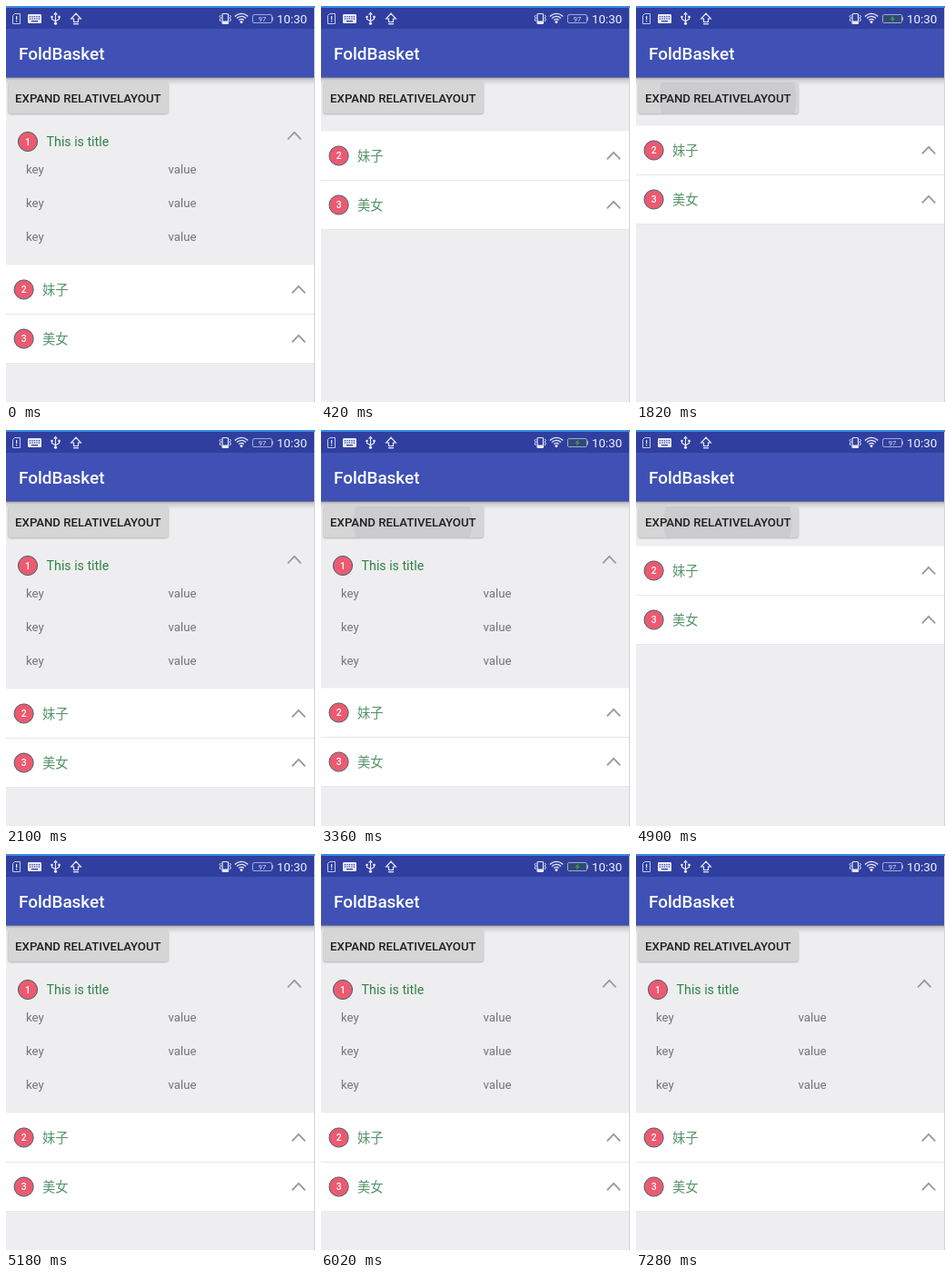
Animation of 340x435 px, one loop 8 s. Source, as an HTML page with a canvas:

```html
<!DOCTYPE html>
<html lang="en">
<head>
<meta charset="utf-8">
<title>Expandable list</title>
<style>
  html, body { margin: 0; width: 100%; height: 100%; overflow: hidden; background: #eeeef0; }
  canvas { display: block; width: 340px; height: 435px; }
</style>
</head>
<body>
<canvas id="stage"></canvas>
<script>
const W = 340, H = 435, LOOP = 8000, STEP = 70;
const PANEL_TOP = 123.5, PANEL_H = 161, ROW_H = 54, ANIM_MS = 300;
const LATIN = 'Roboto, "Noto Sans", sans-serif';
const CJK = '"Noto Sans CJK SC", "Noto Sans CJK", sans-serif';
const GREEN = '#2f8346', SOFT_GREEN = '#55946a', ICON = '#e9ebf7';

// Each tap: finger down, start of the panel motion, panel open afterwards
const TAPS = [
  { down: 70, go: 177, open: false },
  { down: 1680, go: 1777, open: true },
  { down: 3150, go: 3345, open: false },
  { down: 4800, go: 4870, open: true }
];
const CHARGING = [[420, 1890], [3080, 4480], [5810, 7210]];

const canvas = document.getElementById('stage');
const ctx = canvas.getContext('2d');
const dpr = window.devicePixelRatio || 1;
canvas.width = W * dpr;
canvas.height = H * dpr;

const clamp = v => Math.max(0, Math.min(1, v));
const ease = p => (1 - Math.cos(Math.PI * clamp(p))) / 2;

function rect(x, y, w, h, color) {
  ctx.fillStyle = color;
  ctx.fillRect(x, y, w, h);
}

function text(str, x, y, size, color, weight = 400, family = LATIN, align = 'left') {
  ctx.font = `${weight} ${size}px ${family}`;
  ctx.textAlign = align;
  ctx.fillStyle = color;
  ctx.fillText(str, x, y);
}

function line(points, color, width = 1, close = false) {
  ctx.beginPath();
  points.forEach(([x, y], i) => i ? ctx.lineTo(x, y) : ctx.moveTo(x, y));
  if (close) ctx.closePath();
  ctx.strokeStyle = color;
  ctx.lineWidth = width;
  ctx.stroke();
}

function roundPath(x, y, w, h, r) {
  ctx.beginPath();
  ctx.roundRect(x, y, w, h, r);
}

function disc(x, y, r, color) {
  ctx.beginPath();
  ctx.arc(x, y, r, 0, Math.PI * 2);
  ctx.fillStyle = color;
  ctx.fill();
}

function badge(n, x, y) {
  disc(x, y, 10.6, '#ec5a70');
  ctx.strokeStyle = '#45646f';
  ctx.lineWidth = 1;
  ctx.stroke();
  text(n, x, y + 3.7, 10.4, '#fff', 500, LATIN, 'center');
}

function chevron(x, y) {
  line([[x - 7.2, y + 4], [x, y - 3.4], [x + 7.2, y + 4]], '#9a9a9c', 1.8);
}

function battery(t) {
  const charge = Math.max(...CHARGING.map(([on, off]) =>
    t < off ? clamp((t - on) / 140) : 1 - clamp((t - off + 35) / 70)));
  ctx.strokeStyle = '#a0a9d6';
  ctx.lineWidth = 1;
  roundPath(271.5, 9.5, 21, 9, 1.5);
  ctx.stroke();
  rect(293, 12, 1, 4, '#a0a9d6');

  ctx.globalAlpha = 1 - charge;
  text('97', 282, 16.7, 7.6, '#dfe2f4', 400, LATIN, 'center');
  ctx.globalAlpha = charge;
  rect(272, 10, 20, 8, '#314a72');
  line([[283, 11.3], [280.8, 14], [283.6, 14], [281.4, 16.7]], '#45a456', 1.1);
  ctx.globalAlpha = 1;
}

function statusBar(t) {
  rect(0, 0, W, 25, '#303f9f');
  rect(0, 0, W, 2, '#3d8ae2');

  // SIM card
  line([[7.5, 10.5], [9.5, 8.5], [15.5, 8.5], [15.5, 19.5], [7.5, 19.5]], '#c5cae9', 1, true);
  rect(11, 11, 1.2, 4, ICON);
  rect(11, 16, 1.2, 1.3, ICON);

  // Keyboard
  ctx.fillStyle = ICON;
  roundPath(24, 9, 15, 10, 1.2);
  ctx.fill();
  for (let i = 0; i < 5; i++) {
    rect(25.8 + i * 2.5, 11, 1.3, 1.3, '#303f9f');
    rect(25.8 + i * 2.5, 13.4, 1.3, 1.3, '#303f9f');
  }
  rect(28, 16, 7, 1.3, '#303f9f');

  // USB
  line([[54.5, 9], [54.5, 19]], ICON, 1.2);
  line([[50.5, 12], [50.5, 14.5], [54.5, 16.8], [58.5, 14.5], [58.5, 12]], ICON, 1.1);
  line([[52.7, 9.7], [54.5, 7.4], [56.3, 9.7]], ICON, 1.2);
  disc(54.5, 19.2, 1.6, ICON);
  disc(50.5, 12, 1.3, ICON);
  rect(57.3, 10.8, 2.4, 2.4, ICON);

  // Upload arrow
  line([[77, 8.2], [82.3, 14], [79.5, 14], [79.5, 17.5], [74.5, 17.5], [74.5, 14], [71.7, 14]],
    ICON, 1.2, true);
  rect(74, 19, 6, 1.3, ICON);

  // Vibrating phone
  ctx.strokeStyle = ICON;
  ctx.lineWidth = 1.2;
  roundPath(238, 8.5, 6.5, 11, 1);
  ctx.stroke();
  rect(238, 16.5, 6.5, 2.5, ICON);
  for (const [x, d] of [[236.3, -1.2], [246.2, 1.2]]) {
    line([[x, 10], [x + d, 11.5], [x, 13.2], [x + d, 15], [x, 17]], ICON, 1);
  }

  // Wi-Fi
  for (const r of [3.8, 6.8, 9.8]) {
    ctx.beginPath();
    ctx.arc(259, 18.2, r, -Math.PI * 0.76, -Math.PI * 0.24);
    ctx.lineWidth = 1.4;
    ctx.strokeStyle = ICON;
    ctx.stroke();
  }
  disc(259, 17.6, 1.5, ICON);

  battery(t);
  text('10:30', 298, 19, 13.4, '#f3f4fb');
}

function appBar() {
  rect(0, 25, W, 53.5, '#3f51b5');
  const shade = ctx.createLinearGradient(0, 78, 0, 87);
  shade.addColorStop(0, 'rgba(40,40,60,.42)');
  shade.addColorStop(0.35, 'rgba(60,60,70,.17)');
  shade.addColorStop(1, 'rgba(60,60,70,0)');
  rect(0, 78, W, 9, shade);
  text('FoldBasket', 14, 59, 18.9, '#fff', 500);
}

function button(t) {
  const tap = TAPS.find(p => t >= p.down && t < p.go + 240);
  ctx.save();
  ctx.shadowColor = 'rgba(0,0,0,.3)';
  ctx.shadowBlur = 2 * dpr;
  ctx.shadowOffsetY = 0.7 * dpr;
  ctx.fillStyle = '#d6d6d7';
  roundPath(2.5, 84, 176, 34, 2);
  ctx.fill();
  ctx.restore();

  if (tap) {
    const rise = clamp((t - tap.down) / (tap.go - tap.down));
    const fade = 1 - clamp((t - tap.go - 120) / 120);
    const r = t < tap.go ? 15 + 45 * rise : 60 + (t - tap.go) * 0.35;
    ctx.save();
    roundPath(2.5, 84, 176, 34, 2);
    ctx.clip();
    disc(101, 101, r, `rgba(70,50,60,${0.065 * fade})`);
    ctx.restore();
  }
  text('EXPAND RELATIVELAYOUT', 10.1, 106, 13.2, '#1f1f20', 500);
}

function panelHeight(t) {
  const tap = TAPS.filter(p => t >= p.go).pop();
  if (!tap) return PANEL_H;
  const p = ease((t - tap.go) / ANIM_MS);
  return Math.round(PANEL_H * (tap.open ? p : 1 - p));
}

function panel(h) {
  ctx.save();
  ctx.beginPath();
  ctx.rect(0, PANEL_TOP, W, h);
  ctx.clip();
  badge('1', 24, 149);
  text('This is title', 44.6, 153.5, 14.2, GREEN);
  chevron(317.3, 142.3);
  for (let i = 0; i < 3; i++) {
    text('key', 22, 183.7 + i * 37, 13.2, '#747476');
    text('value', 178.5, 183.7 + i * 37, 13.2, '#747476');
  }
  ctx.restore();
}

function row(n, label, y) {
  rect(0, y, W, ROW_H, '#fff');
  rect(0, y + ROW_H - 0.5, W, 1, '#e8e8ea');
  badge(n, 19.6, y + 27);
  text(label, 40, y + 32.5, 14.3, SOFT_GREEN, 300, CJK);
  chevron(322, y + 26.8);
}

function draw(t) {
  ctx.setTransform(dpr, 0, 0, dpr, 0, 0);
  rect(0, 0, W, H, '#eeeef0');
  const h = panelHeight(t);
  panel(h);
  row('3', '美女', PANEL_TOP + h + ROW_H);
  row('2', '妹子', PANEL_TOP + h);
  statusBar(t);
  appBar();
  rect(339, 2, 1, H - 2, '#d2d2d5');
  button(t);
}

const start = performance.now();
function tick() {
  const t = (performance.now() - start) % LOOP;
  draw(Math.floor(t / STEP) * STEP);
  requestAnimationFrame(tick);
}
tick();
</script>
</body>
</html>
```
